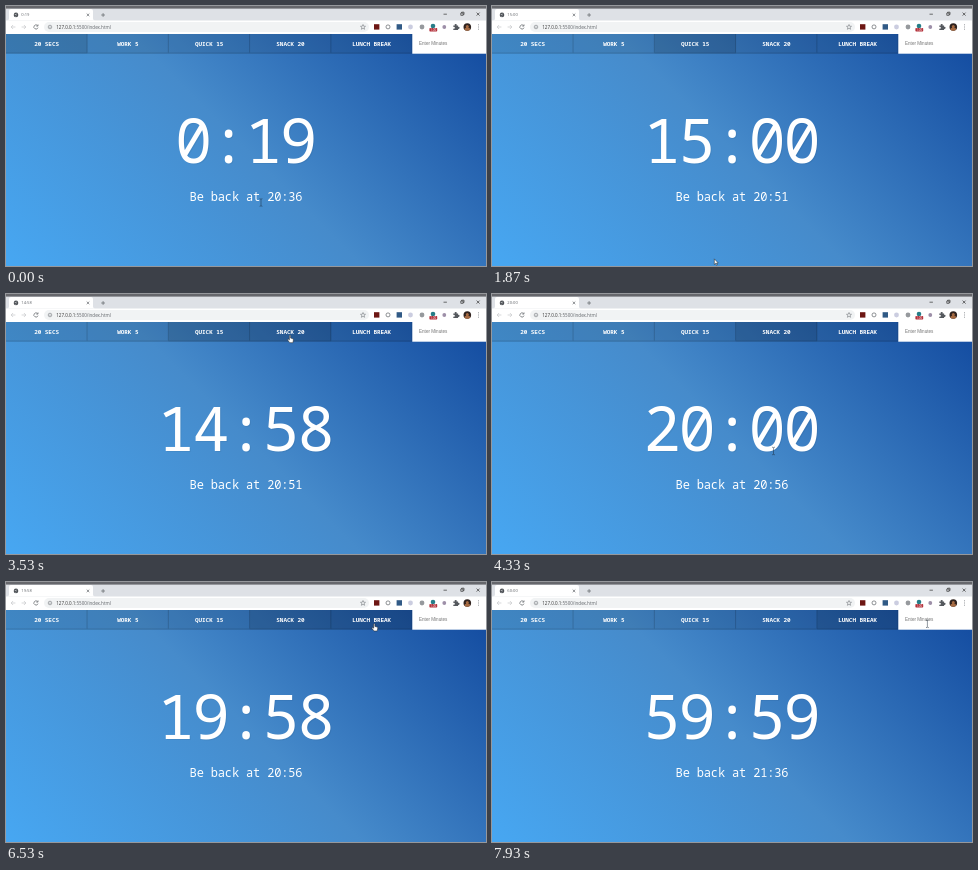
An HTML page that plays this animation: 480x260 px, repeating every 8000 ms.

```html
<!DOCTYPE html>
<html lang="en">
<head>
<meta charset="utf-8">
<title>Countdown timer</title>
<style>
  html, body { margin: 0; width: 100%; height: 100%; overflow: hidden; }
  svg { display: block; width: 100vw; height: 100vh; }
  .mono { font-family: "Noto Sans Mono", monospace; fill: #fff; text-anchor: middle; }
  .time { font-size: 62px; font-weight: 300; letter-spacing: -2.2px; }
  .back { font-size: 12px; letter-spacing: -.15px; }
  .label { font-size: 6px; font-weight: 600; letter-spacing: -.09px; }
  .ui { font-family: "Open Sans", sans-serif; fill: #5f6368; }
  .line { fill: none; stroke: #5f6368; stroke-width: .7; }
  .thin { stroke-width: .5; }
  .pale { stroke: #c4c6c9; }
  .dark { stroke: #333; }
</style>
</head>
<body>
<svg viewBox="0 0 480 260" preserveAspectRatio="none">
  <defs>
    <linearGradient id="sky" gradientUnits="userSpaceOnUse" x1="62" y1="322" x2="418" y2="-34">
      <stop offset="0" stop-color="#47a7f2"/>
      <stop offset=".5" stop-color="#468bcb"/>
      <stop offset="1" stop-color="#124a9f"/>
    </linearGradient>
  </defs>

  <!-- browser window -->
  <rect width="480" height="28" fill="#fff"/>
  <rect width="480" height="14.5" fill="#dee1e6"/>
  <path d="M1 14.5q2 0 2-2V5q0-2 2-2h80q2 0 2 2v7.5q0 2 2 2z" fill="#fff"/>
  <rect width="480" height="2.6" fill="#66676c"/>
  <circle cx="10" cy="8.9" r="2.3" fill="#4c5055"/>
  <path d="M8.6 8.2l1.5.5.9-1.2M9.4 10.4l1-.6" stroke="#fff" stroke-width=".5" fill="none"/>
  <text id="title" class="ui" x="15.3" y="10.3" font-size="4.1"></text>
  <path class="line" d="M80.7 7.6l2.6 2.6m0-2.6l-2.6 2.6M95.2 9h3.8m-1.9-1.9v3.8"/>
  <path class="line dark" d="M437.5 8.2h3.4M454.8 7h2.3v2.3h-2.3zM455.6 7v-.8h2.4v2.4h-.8M470.6 6.6l3 3m0-3l-3 3"/>
  <path class="line pale" d="M9.4 21H5.1m2-2l-2 2 2 2M15.6 21h4.3m-2-2l2 2-2 2"/>
  <path class="line" d="M31.6 19.6a2.1 2.1 0 1 0 .4 2M32 18.4v1.7h-1.7"/>
  <rect x="38" y="16" width="325" height="10" rx="5" fill="#f1f3f4"/>
  <circle class="line thin" cx="44" cy="21" r="1.8"/>
  <path class="line thin" d="M44 20.8v1.2m0-2.1v.4"/>
  <text class="ui" x="50.3" y="22.6" font-size="4.5"><tspan fill="#333">127.0.0.1</tspan>:5500/index.html</text>
  <path class="line thin" d="M357 18.5l.7 1.7 1.8.1-1.4 1.2.5 1.8-1.6-1-1.6 1 .5-1.8-1.4-1.2 1.8-.1z"/>
  <rect x="368" y="18.2" width="5.4" height="5.4" fill="#6d1713"/>
  <circle class="line" cx="382" cy="20.9" r="2"/>
  <rect x="390.6" y="18.2" width="5.4" height="5.4" fill="#315a86"/>
  <circle cx="404.5" cy="21" r="2.4" fill="#cbcde0"/>
  <circle cx="416" cy="21" r="2.4" fill="#96999d"/>
  <circle cx="427" cy="20" r="2.3" fill="#267d88"/>
  <rect x="423.4" y="22" width="7.8" height="3.5" rx=".7" fill="#b3303a"/>
  <text class="ui" x="427.3" y="24.8" font-size="3" text-anchor="middle" style="fill:#fff">1.00</text>
  <circle cx="438.3" cy="21" r="1.9" fill="#9d8fa8"/>
  <path d="M447.3 19.4h1.5a1 1 0 1 1 1.8 0h1.5v1.5a1 1 0 1 1 0 1.8v1.2h-4.8v-1.3a1 1 0 1 0 0-1.7z" fill="#55595e"/>
  <circle cx="461.3" cy="21" r="3.8" fill="#30231f"/>
  <path d="M458.2 23.2q.4-1.2 2-1.5a1.5 1.5 0 1 1 2.2 0q1.6.3 2 1.5a3.8 3.8 0 0 1-6.2 0z" fill="#a66b43"/>
  <path d="M472.5 18.3v5.4" stroke="#8b8e92" stroke-width=".9" stroke-dasharray="1 1.2"/>

  <!-- page -->
  <rect y="28" width="480" height="232" fill="url(#sky)"/>
  <g id="nav"></g>
  <rect x="406.3" y="28" width="73.7" height="19.7" fill="#fff"/>
  <text x="413" y="39.2" font-size="4.6" fill="#757575" font-family="Liberation Sans, sans-serif">Enter Minutes</text>
  <text id="shade" class="mono time" x="239.9" y="157.8" style="fill:#000" opacity=".05"></text>
  <text id="time" class="mono time" x="238.9" y="156.8"></text>
  <text id="back" class="mono back" x="240" y="195.3"></text>

  <g id="cursor" stroke-linejoin="round">
    <path d="M0 0v5.6l1.3-1.2.9 2 .8-.4-.9-1.9h1.8z" fill="#fff" stroke="#222" stroke-width=".5"/>
    <path d="M-.6.6q.6-1 1.2 0v2.5l2.3.7q.7.3.5 1.2l-.5 2.7h-3.2L-2.3 5q-.2-1 .6-.9l1.1.8z" fill="#fff" stroke="#222" stroke-width=".5"/>
    <path d="M-1.4-3.8q1.4 0 1.4.7 0-.7 1.4-.7M0-3.1v6.2M-1.4 3.8Q0 3.8 0 3.1q0 .7 1.4.7" fill="none" stroke="#1d2b3a" stroke-width=".6" opacity=".8"/>
  </g>
</svg>
<script>
const LOOP = 8000, TITLE_LAG = 100, BUTTON = 81.26;
const $ = id => document.getElementById(id);

const labels = ['20 SECS', 'WORK 5', 'QUICK 15', 'SNACK 20', 'LUNCH BREAK'];
// [start, seconds left, return time]
const ticks = [
  [0, 19, '20:36'], [430, 18, '20:36'],
  [1130, 900, '20:51'], [2130, 899, '20:51'], [3130, 898, '20:51'],
  [3910, 1200, '20:56'], [4990, 1199, '20:56'], [5910, 1198, '20:56'],
  [6900, 3600, '21:36'], [7910, 3599, '21:36']
];
// [start, focused button]
const focus = [[0, 0], [940, 2], [3870, 3], [6850, 4]];
// [time, x, y]
const path = [
  [70, 255, 196.5], [870, 208.7, 40], [1150, 208.7, 40], [1740, 222, 254],
  [1800, 222, 254], [2600, 237, 204], [2670, 237, 204], [2760, 211, 184],
  [2930, 315, 120], [3070, 315, 120], [3450, 284, 41], [3940, 284, 41],
  [4330, 281.5, 157], [5600, 281.5, 157], [5900, 305, 149], [6400, 368.3, 41.3],
  [6950, 368.3, 41.3], [7270, 244, 189], [7330, 350, 101], [7470, 350, 101],
  [7870, 435.4, 41.8]
];

$('nav').innerHTML = labels.map((label, i) => {
  const x = i * BUTTON;
  return `<rect x="${x}" y="28" width="${BUTTON}" height="19.5"/>
    <path d="M${x} 47.1h${BUTTON}M${x + BUTTON - .2} 28v18.7" stroke="#000" stroke-width=".8" opacity=".2"/>
    <text class="mono label" x="${x + BUTTON / 2}" y="39.5">${label}</text>`;
}).join('');
const buttons = [...$('nav').querySelectorAll('rect')];
const shapes = [...$('cursor').children];

const latest = (list, t) => list.filter(e => e[0] <= t).pop() || list[0];
const clock = s => `${Math.floor(s / 60)}:${String(s % 60).padStart(2, '0')}`;
const inside = (x, y, l, t, r, b) => x >= l && x < r && y >= t && y < b;

function pointer(t) {
  const next = path.findIndex(p => p[0] > t);
  if (next === 0) return path[0].slice(1);
  if (next < 0) return path[path.length - 1].slice(1);
  const [t0, x0, y0] = path[next - 1], [t1, x1, y1] = path[next];
  const u = (t - t0) / (t1 - t0), k = u * u * (3 - 2 * u);
  return [x0 + (x1 - x0) * k, y0 + (y1 - y0) * k];
}

function shapeAt(x, y) {
  if (y < 47) return x < 406 ? 1 : 2;
  const overText = inside(x, y, 152, 98, 328, 170) || inside(x, y, 183, 180, 297, 199);
  return overText ? 2 : 0;
}

function draw(t) {
  const [, left, back] = latest(ticks, t);
  $('time').textContent = $('shade').textContent = clock(left);
  $('back').textContent = 'Be back at ' + back;
  $('title').textContent = clock(latest(ticks, t - TITLE_LAG)[1]);

  const [x, y] = pointer(t), shape = shapeAt(x, y);
  $('cursor').setAttribute('transform', `translate(${x} ${y})`);
  shapes.forEach((s, i) => s.setAttribute('visibility', i === shape ? 'visible' : 'hidden'));

  const active = latest(focus, t)[1];
  const hover = shape === 1 ? Math.floor(x / BUTTON) : -1;
  buttons.forEach((b, i) => b.setAttribute('fill-opacity', i === active || i === hover ? .2 : .1));
}

function loop() {
  draw(performance.now() % LOOP);
  requestAnimationFrame(loop);
}
loop();
</script>
</body>
</html>
```
